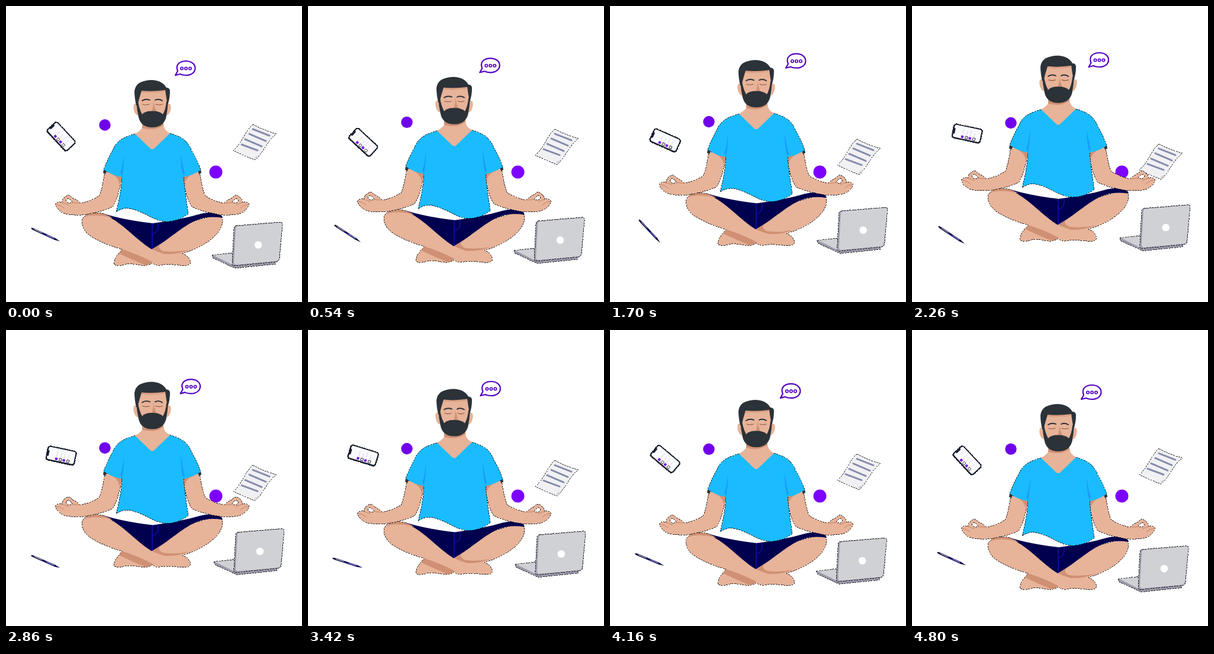
These frames come from a looping animation (500 by 500 pixels, 4.82 s). An HTML page:

```html
<!DOCTYPE html>
<html lang="en">
<head>
<meta charset="utf-8">
<title>Floating meditation</title>
<style>
  html, body { margin: 0; width: 100%; height: 100%; overflow: hidden; background: #fff; }
  svg { display: block; width: 100vw; height: 100vh; }
  .skin { fill: #e7b399; }
  .shade { fill: #cf9073; }
  .hair { fill: #2b3238; }
  .edge { stroke: #000; stroke-width: .8; stroke-dasharray: 3 1.5; shape-rendering: crispEdges; }
  .line { fill: none; stroke-linecap: round; }
</style>
</head>
<body>
<svg viewBox="0 0 500 500">
  <defs>
    <g id="arm">
      <path class="skin edge" fill-rule="evenodd" d="M167 279C164 300 161 314 157 321C147 327 137 331 126 333C121 329 117 326 112 324C109 320 105 318 102 321C98 323 94 327 95 332C91 330 86 331 84 334C83 339 88 344 92 347C100 354 115 353 130 353C150 350 172 344 180 339C187 330 193 308 196 286ZM102 330C101 325 105 324 108 327L112 331C108 334 104 334 102 330Z"/>
      <path class="shade" d="M170 279L196 288L193 306C192 290 182 285 170 279Z"/>
      <path class="hair" d="M165 276L170 278L168 284L164 282Z"/>
      <path class="line" stroke="#b87558" stroke-width=".8" d="M85 335Q92 336 98 341M95 332Q101 334 105 336M112 332Q119 333 126 333"/>
    </g>
  </defs>

  <circle cx="354.5" cy="280.5" r="11" fill="#7d00ff"/>
  <circle id="badge" cx="167" r="9.7" fill="#7000ec"/>

  <g id="paper">
    <path class="edge" fill="#f1f1f4" d="M417 200Q435 210 457 216C442 226 436 246 421 260Q402 253 384 244C399 232 403 212 417 200Z"/>
    <path fill="#d4d4dc" d="M421 260L420 255L428 252Z"/>
    <path class="line" stroke="#868cab" stroke-width="3" stroke-linecap="butt" d="M417 208L445 219M411 216L439 228M404 225L432 237M398 234L425 244"/>
  </g>

  <g id="man">
    <path class="skin edge" d="M165 351C150 347 134 349 129 360C126 372 134 384 147 391C160 399 180 407 196 411C190 419 186 423 184 427L182 435C185 441 196 438 203 436C216 434 230 440 238 438Q243 437 247 434Q252 439 260 438C276 434 297 440 306 438C313 437 312 431 310 428C308 423 303 420 298 418C330 409 358 390 364 372C368 364 366 355 358 352L322 362L247 390L190 365Z"/>
    <path fill="#00004e" d="M163 350Q196 361 248 367Q295 361 329 351Q345 347 358 350Q365 353 366 358Q342 354 324 361C298 371 277 394 246 411C220 395 197 366 163 350Z"/>
    <path class="shade" d="M131 357Q140 347 164 351Q174 354 180 358Q150 350 131 357ZM196 411Q224 420 247 432Q244 437 236 438Q214 429 191 418ZM261 402Q254 408 265 414Q286 417 309 412Q290 420 268 419Q255 415 247 411Z"/>
    <path class="line" stroke="#1818e8" stroke-width="1" d="M247 368V410M257 367Q259 382 248 385"/>
    <use href="#arm"/>
    <use href="#arm" transform="matrix(-1 0 0 1 494 0)"/>

    <path class="skin" d="M230 196V206Q225 213 217 216L247 246L278 215Q267 211 266 200Z"/>
    <path class="shade" d="M230 199V206Q252 212 266 201V196Z"/>
    <path id="shirt" fill="#1abcff" d="M218 216L243 240Q247 244 251 240L277 215C294 220 307 226 314 245Q323 260 329 277Q316 286 300 289Q303 320 308 351C295 361 280 365 268 364C250 362 238 351 222 346C208 340 197 340 186 348Q194 318 196 289Q178 286 165 276Q172 258 180 244C187 226 201 221 218 216Z"/>
    <path class="edge" fill="none" d="M218 216C201 221 187 226 180 244Q172 258 165 276M277 215C294 220 307 226 314 245Q323 260 329 277M308 351C295 361 280 365 268 364C250 362 238 351 222 346C208 340 197 340 186 348Q194 318 196 289M300 289Q303 320 308 351"/>
    <path fill="#199bff" d="M199 249Q200 270 196 288L193 282Q198 270 199 249ZM295 249Q298 268 302 284L299 286Q295 272 295 249Z"/>

    <path class="skin" d="M222 166Q214 162 215.500 174Q218 186 225 185ZM271 166Q280 162 278.500 174Q276 186 269 185Z"/>
    <path class="skin" d="M222 140H272V180Q268 199 247 201Q227 199 223 180Z"/>
    <path class="shade" d="M249 160Q251 172 254 178Q249 183 243 179Q249 179 249 160Z"/>
    <path class="shade" opacity=".55" d="M228 142H268V145Q247 148 228 146Z"/>
    <path class="hair" d="M220 168Q217 155 217 144Q218 135 225 130Q235 125 247 125Q264 126 271 138Q276 138 277 143Q277 157 273 167Q271 157 269 142Q247 145 229 143Q225 156 222 168Z"/>
    <path class="hair" d="M220 160L223 161Q225 174 230 183Q235 177 247 177.500Q259 177 265 183Q270 174 271 161L274 160Q273 175 270.500 188Q266 205 247 205Q228 205 224 188Q221 175 220 160Z"/>
    <path class="line" stroke="#2b3238" stroke-width="1.9" d="M230 160Q236 156 243 159M252 159Q258 156 264 160"/>
    <path class="line" stroke="#8c5543" stroke-width="1.1" d="M231 166Q236 168 242 166M253 166Q259 168 264 166"/>
  </g>

  <g id="phone">
    <rect class="edge" x="-25" y="-12.5" width="50" height="25" rx="4.5" fill="#182034"/>
    <rect x="-23" y="-10.8" width="46" height="21" rx="3" fill="#fafafd"/>
    <rect x="-24" y="-5" width="3.2" height="10" rx="1.5" fill="#182034"/>
    <path class="line" stroke="#d4d4de" stroke-width=".9" d="M-7 -6V3M0 -4V3M6 -6V3M13 -4V3"/>
    <path fill="#7000ec" d="M-9 5h4v4h-4zM4 5h4v4h-4z"/>
    <path fill="#fff" stroke="#222" stroke-width=".9" d="M-2 5h4v4h-4zM11 5h4v4h-4z"/>
  </g>

  <g id="pen">
    <path fill="#06063f" d="M-26.5 -1L-22 -1.6H17L26.5 0L17 1.6H-22L-26.5 1Z"/>
    <path class="line" stroke="#fff" stroke-width=".8" d="M-21 -.3H-7M2 -.3H15"/>
    <path class="line" stroke="#2424c8" stroke-width=".8" d="M-6 .5H16"/>
  </g>

  <g id="bubble" class="line" stroke="#5200c4" stroke-width="2.200">
    <path stroke-linejoin="round" d="M290 110C285 98 295 93 304 93C313 93 319.500 98 319.500 105C319.500 112 313 117 304 117Q298 117 294 115L286 117Z"/>
    <g stroke-width="1.700">
      <circle cx="297" cy="105.500" r="2.200"/><circle cx="304" cy="105.500" r="2.200"/><circle cx="311" cy="105.500" r="2.200"/>
    </g>
  </g>

  <g id="laptop">
    <path class="edge" fill="#9c99aa" d="M348 421L383 417L460 430L455 432V436L387 443L350 426Z"/>
    <path fill="#d0d1d5" d="M350 421L383 418L400 436L386 439Z"/>
    <path class="edge" fill="#9c99aa" d="M389 371L463 365Q468 365 467 370L462 427Q461 431 457 432L386 439Q381 439 382 434L385 376Q385 372 389 371Z"/>
    <path fill="#d0d1d5" d="M392 372L463 366Q467 366 466.500 370L461 426Q460 430 456 431L389 437Q385 437 385 433L388 376Q388 372 392 372Z"/>
    <circle cx="426" cy="403.500" r="6.300" fill="#fff"/>
  </g>
</svg>
<script>
  const LOOP = 4820;
  const TIMES = [0, 1060, 1700, 2260, 3420, 4160];
  const parts = Object.fromEntries(
    ['badge', 'paper', 'man', 'phone', 'pen', 'bubble', 'laptop']
      .map(id => [id, document.getElementById(id)]));

  // Smooth cyclic curve through one value per entry of TIMES.
  function track(t, values) {
    const n = TIMES.length;
    const time = i => TIMES[(i + n) % n] + Math.floor(i / n) * LOOP;
    const value = i => values[(i + n) % n];
    const slope = i => (value(i + 1) - value(i - 1)) / (time(i + 1) - time(i - 1));
    let i = n - 1;
    while (TIMES[i] > t) i--;
    const span = time(i + 1) - time(i), u = (t - time(i)) / span, v = 1 - u;
    return value(i) * v * v * (1 + 2 * u) + value(i + 1) * u * u * (3 - 2 * u)
      + span * u * v * (slope(i) * v - slope(i + 1) * u);
  }

  function place(part, x, y, angle = 0) {
    part.setAttribute('transform', `translate(${x} ${y}) rotate(${angle})`);
  }

  function draw(now) {
    const t = now % LOOP, u = t / LOOP;
    const lift = Math.sin(Math.PI * u ** 1.12);
    const drift = t < 2260 ? 1 - (1 - t / 2260) ** 1.5 : ((LOOP - t) / (LOOP - 2260)) ** 1.4;

    place(parts.man, 0, -20.7 * (1 - Math.cos(2 * Math.PI * u ** 0.985)));
    place(parts.paper, 0, 35 * (1 - Math.abs(1 - 2 * u)));
    place(parts.laptop, 3 * lift ** 3, -30 * lift);
    place(parts.bubble, 12.5 * drift, -14 * drift);
    place(parts.badge, 0, track(t, [201, 192.5, 195.5, 197.5, 200.5, 201.3]));
    place(parts.phone, 93.2, track(t, [220.5, 237.5, 227, 215.5, 212, 218]),
      track(t, [47, 36, 24, 12, 17, 40]));
    place(parts.pen, 67, track(t, [386.5, 382.5, 380.5, 387, 393.5, 388]),
      track(t, [24.6, 41.5, 47, 33.4, 17.7, 22.6]));
    requestAnimationFrame(draw);
  }
  draw(performance.now());
</script>
</body>
</html>
```
